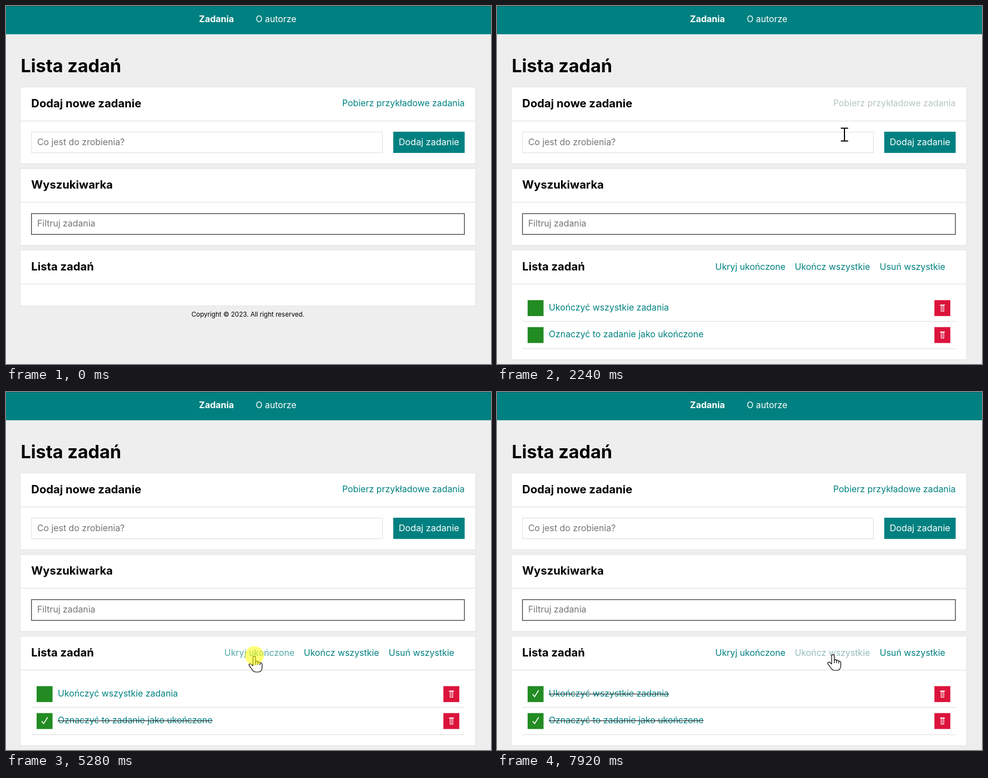
Recreate the animation shown at these times as an HTML page with a canvas. Size 871 px wide and 643 px high, loop 7990 ms.

```html
<!DOCTYPE html>
<html lang="pl">
<head>
<meta charset="utf-8">
<title>Lista zadań</title>
<style>
html, body { margin: 0; width: 100%; height: 100%; overflow: hidden; background: #eee; }
canvas { display: block; }
</style>
</head>
<body>
<canvas id="stage" width="871" height="643"></canvas>
<script>
const ctx = document.getElementById('stage').getContext('2d');
const LOOP = 7990, PRESS = 100, FADE = 400;
const FONT = 'Inter, "Open Sans", sans-serif';
const TEAL = [0, 128, 128], HOVER = [82, 168, 168], GREY = [204, 204, 204];
const BRAND = `rgb(${TEAL})`, LINE = '#ddd', HINT = '#757575';

// Page layout
const LEFT = 26.2, RIGHT = 842.8, PAD = 19.1;
const INNER = LEFT + PAD, INNER_END = RIGHT - PAD;
const panelTop = i => 145.8 + 146.6 * i;
const ROW = 48.4, BOX = 28.6;

// Moments at which the mouse button goes down
const taps = { load: 800, first: 3180, second: 3600, undo: 4190, hide: 5210, show: 5720, finish: 7600 };
const released = (t, name) => t >= taps[name] + PRESS;
const LOADED = 2200;

// Pointer moves: start, end, target and downward bow
const START = { x: 832, y: 606 };
const moves = [
  { from: 70, to: 700, x: 761, y: 178, bow: 0 },
  { from: 950, to: 1100, x: 760, y: 181, bow: 0 },
  { from: 1760, to: 2240, x: 624, y: 231, bow: 0 },
  { from: 2280, to: 3120, x: 82, y: 547, bow: 62 },
  { from: 3330, to: 3560, x: 80, y: 583, bow: 0 },
  { from: 3780, to: 4050, x: 82, y: 550, bow: 0 },
  { from: 4340, to: 4920, x: 445.5, y: 474, bow: 8 },
  { from: 6480, to: 6850, x: 222, y: 517, bow: 8 },
  { from: 6850, to: 7450, x: 603, y: 471, bow: 8 }
];

const clamp = k => Math.min(1, Math.max(0, k));
const lerp = (a, b, k) => a + (b - a) * k;
const ease = k => (1 - Math.cos(Math.PI * k)) / 2;

function pointerAt(t) {
  let p = START;
  for (const m of moves) {
    if (t < m.from) break;
    const k = ease(clamp((t - m.from) / (m.to - m.from)));
    p = { x: lerp(p.x, m.x, k), y: lerp(p.y, m.y, k) + m.bow * Math.sin(Math.PI * k) };
  }
  return p;
}

// Starts teal, then fades to each colour from its moment on
function tint(t, ...fades) {
  let color = TEAL;
  for (const [at, next] of fades) {
    const k = clamp((t - at) / FADE);
    color = color.map((v, i) => lerp(v, next[i], k));
  }
  return `rgb(${color.map(Math.round)})`;
}

// Clickable areas and text fields of the current picture
let hot, fields;
const inside = (areas, p) =>
  areas.some(([x, y, w, h]) => p.x >= x && p.x <= x + w && p.y >= y && p.y <= y + h);

function rect(x, y, w, h, color) {
  ctx.fillStyle = color;
  ctx.fillRect(x, y, w, h);
}

function frame(x, y, w, h, color) {
  ctx.strokeStyle = color;
  ctx.lineWidth = 1;
  ctx.strokeRect(x + 0.5, y + 0.5, w - 1, h - 1);
}

function text(str, x, y, color, size = 15.85, weight = 400, align = 'left') {
  ctx.font = `${weight} ${size}px ${FONT}`;
  ctx.textAlign = align;
  ctx.fillStyle = color;
  ctx.fillText(str, x, y);
  return ctx.measureText(str).width;
}

function link(str, right, y, color) {
  const width = text(str, right, y, color, 15.85, 400, 'right');
  hot.push([right - width, y - 16, width, 22]);
}

function field(y, width, hint, color) {
  frame(INNER, y, width, 38.3, color);
  text(hint, INNER + 10.7, y + 23.7, HINT);
  fields.push([INNER, y, width, 38]);
}

function panel(i, bottom, title) {
  const top = panelTop(i);
  rect(LEFT, top, RIGHT - LEFT, bottom - top, '#fff');
  frame(LEFT - 1, top - 1, RIGHT - LEFT + 2, bottom - top + 2, '#e4e4e4');
  rect(LEFT, Math.round(top + 60), RIGHT - LEFT, 1, LINE);
  text(title, INNER, top + 36, '#000', 20.2, 700);
  return top;
}

function task(i, label, done, p) {
  const y = panelTop(2) + 89.3 + ROW * i, x = 55;
  const box = [x, y, BOX, BOX];
  rect(...box, inside([box], p) ? '#279527' : '#228b22');
  const width = text(label, 93, y + 18.7, BRAND);
  hot.push(box, [93, y + 4, width, 20]);
  if (done) {
    ctx.strokeStyle = '#fff';
    ctx.lineWidth = 1.6;
    ctx.stroke(new Path2D(`M${x + 9} ${y + 14.5}l3.5 4.5l7.3-11.5`));
    rect(93, Math.round(y + 13.7), width, 1, '#111');
  }
  rect(785.5, y, BOX, BOX, '#dc143c');
  frame(797, y + 9.5, 6, 11, '#fff');
  rect(795.5, y + 8, 9, 1.5, '#fff');
  rect(799.5, y + 11, 1, 8, '#fff');
  rect(INNER, Math.round(y + 38), INNER_END - INNER, 1, LINE);
}

function page(t, p) {
  const loaded = t >= LOADED;
  const loading = released(t, 'load') && !loaded;
  const hidden = released(t, 'hide') && !released(t, 'show');
  const firstDone = released(t, 'first') && !released(t, 'undo') || released(t, 'finish');
  const secondDone = released(t, 'second');
  const rows = !loaded ? 0 : hidden ? 1 : 2;
  const bottom = 538 + ROW * rows;
  hot = [];
  fields = [];

  rect(0, 0, 871, 643, '#eee');
  rect(0, 0, 871, 50.7, BRAND);
  rect(0, 0, 871, 1, '#076565');
  text('Zadania', 346.5, 28.5, '#fff', 16, 700);
  text('O autorze', 448.5, 28.5, '#fff');
  text('Lista zadań', 26.5, 119, '#000', 32.4, 700);

  let top = panel(0, 282.8, 'Dodaj nowe zadanie');
  link(loading ? 'Ładowanie...' : 'Pobierz przykładowe zadania', INNER_END, top + 34.5,
       tint(t, [700, HOVER], [taps.load + PRESS, GREY], [LOADED, TEAL]));
  field(top + 80, 631.3, 'Co jest do zrobienia?', LINE);
  rect(695.4, top + 80, INNER_END - 695.4, 38.1, BRAND);
  text('Dodaj zadanie', 759.6, top + 104, '#fff', 16.2, 400, 'center');

  top = panel(1, 429.5, 'Wyszukiwarka');
  field(top + 80, INNER_END - INNER, 'Filtruj zadania', '#000');

  top = panel(2, bottom, 'Lista zadań');
  if (loaded) {
    const y = top + 34.5;
    link(hidden ? 'Pokaż ukończone' : 'Ukryj ukończone', 518, y, tint(t, [4850, HOVER], [6480, TEAL]));
    link('Ukończ wszystkie', 670, y,
         tint(t, [taps.second + PRESS, GREY], [taps.undo + PRESS, TEAL],
              [7200, HOVER], [taps.finish + PRESS, GREY]));
    link('Usuń wszystkie', 805, y, BRAND);
    task(0, 'Ukończyć wszystkie zadania', firstDone, p);
    if (!hidden) task(1, 'Oznaczyć to zadanie jako ukończone', secondDone, p);
  }
  text('Copyright © 2023. All right reserved.', 434.5, bottom + 20, '#000', 11.6, 400, 'center');
}

const HAND = new Path2D('M-2 17.5V3C-2-.2 2.8-.2 2.8 3V11C3.4 9 6.8 9.3 6.8 11.7' +
  'C7.6 10 10.8 10.4 10.8 13C11.6 11.7 14.4 12.2 14.4 15V20.5C14.4 26 11.6 29 7 29H4' +
  'C0 29-2.2 27-3.9 24L-8.6 17.6C-10.2 15-7.2 13.4-5.2 14.8Z');
const KNUCKLES = new Path2D('M2.8 11v5m4-4.5v4.5m4-3v3.5');
const ARROW = new Path2D('M0 0v20.5l4.8-4.5l3.2 7.6l3.4-1.4l-3.2-7.4h6.6z');
const BEAM = new Path2D('M-6.5-11.5h13m-6.5 0v23m-6.5 0h13');

function pointer(t, p) {
  ctx.save();
  ctx.translate(p.x, p.y);
  ctx.lineJoin = 'round';
  ctx.strokeStyle = '#000';
  ctx.fillStyle = '#fff';
  ctx.lineWidth = 1.2;
  if (inside(fields, p)) {
    ctx.lineWidth = 2;
    ctx.stroke(BEAM);
  } else {
    const hand = inside(hot, p);
    const shape = hand ? HAND : ARROW;
    ctx.fill(shape);
    ctx.stroke(shape);
    if (hand) ctx.stroke(KNUCKLES);
  }
  if (Object.values(taps).some(at => t >= at && t < at + PRESS)) {
    ctx.fillStyle = 'rgba(255,255,0,.55)';
    ctx.beginPath();
    ctx.arc(0.5, -0.5, 17, 0, Math.PI * 2);
    ctx.fill();
  }
  ctx.restore();
}

function draw(now) {
  const t = now % LOOP;
  const p = pointerAt(t);
  page(t, p);
  if (t >= moves[0].from) pointer(t, p);
  requestAnimationFrame(draw);
}
requestAnimationFrame(draw);
</script>
</body>
</html>
```
